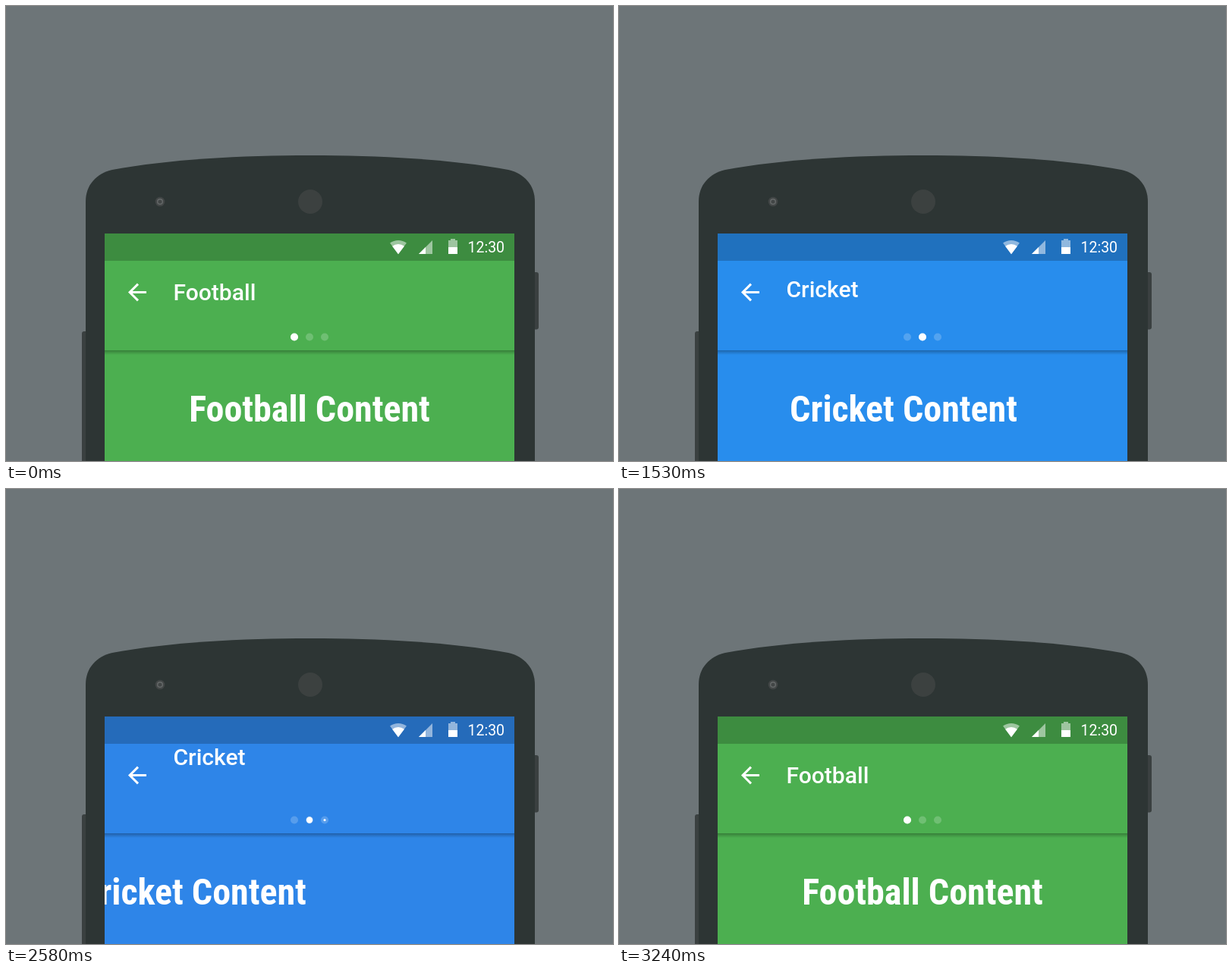
Animation, 800 px wide and 600 px high, one loop 4.14 s. Source, as an HTML page with a canvas:

```html
<!DOCTYPE html>
<html lang="en">
<head>
<meta charset="utf-8">
<title>Sports pager</title>
<style>
  html, body { margin: 0; width: 100%; height: 100%; overflow: hidden; background: #6d7578; }
  canvas { display: block; width: 800px; height: 600px; }
</style>
</head>
<body>
<canvas id="stage" width="800" height="600"></canvas>
<script>
const ctx = document.getElementById('stage').getContext('2d');
const LOOP = 4140, STEP = 30, SLIDE = 300;
const SCREEN = { x: 130, y: 300, w: 540, h: 300 };
const BAR_TOP = 336, BAR_BOTTOM = 454;
const TITLE_RATIO = 0.155;

const pages = [
  { name: 'Football', color: [76, 175, 80] },
  { name: 'Cricket', color: [33, 150, 243] },
  { name: 'Golf', color: [103, 58, 183] }
];

// Backward slides replay the forward motion in reverse.
const slides = [
  { start: 900, from: 0, to: 1 },
  { start: 1500, from: 1, to: 2 },
  { start: 2335, from: 2, to: 1 },
  { start: 2939, from: 1, to: 0 }
];

const clamp = v => Math.min(1, Math.max(0, v));
const rgb = c => `rgb(${c.map(Math.round).join(',')})`;
const white = a => `rgba(255,255,255,${a})`;
const leaveOffset = p => -25000 * p ** 3;
const enterOffset = p => p < 1 ? 2400 * 2 ** (-10 * p) : 0;

function rect(x, y, w, h, fill) {
  ctx.fillStyle = fill;
  ctx.fillRect(x, y, w, h);
}

function circle(x, y, r, fill) {
  ctx.fillStyle = fill;
  ctx.beginPath();
  ctx.arc(x, y, r, 0, Math.PI * 2);
  ctx.fill();
}

function polygon(points, fill) {
  ctx.fillStyle = fill;
  ctx.beginPath();
  points.forEach(([x, y]) => ctx.lineTo(x, y));
  ctx.fill();
}

function text(str, x, y, font, align = 'left') {
  ctx.font = font;
  ctx.textAlign = align;
  ctx.fillStyle = '#fff';
  ctx.fillText(str, x, y);
}

function clipped(x, y, w, h, draw) {
  ctx.save();
  ctx.beginPath();
  ctx.rect(x, y, w, h);
  ctx.clip();
  draw();
  ctx.restore();
}

function pose(time) {
  let page = 0;
  for (const { start, from, to } of slides) {
    if (time <= start) break;
    const p = (time - start) / SLIDE;
    if (p < 1) return to > from ? { left: from, right: to, p } : { left: to, right: from, p: 1 - p };
    page = to;
  }
  return { left: page, right: page, p: 1 };
}

function drawPhone() {
  rect(0, 0, 800, 600, '#6d7578');
  ctx.fillStyle = '#3a4040';
  ctx.beginPath();
  ctx.roundRect(100, 429, 10, 180, 3);
  ctx.roundRect(692, 351, 10, 75.5, 3);
  ctx.fill();
  ctx.fillStyle = '#2d3534';
  ctx.beginPath();
  ctx.moveTo(105, 600);
  ctx.lineTo(105, 258);
  ctx.bezierCurveTo(105, 236, 119, 221, 140, 216);
  ctx.bezierCurveTo(215, 202, 310, 197, 401, 197);
  ctx.bezierCurveTo(492, 197, 587, 202, 662, 216);
  ctx.bezierCurveTo(683, 221, 697, 236, 697, 258);
  ctx.lineTo(697, 600);
  ctx.fill();
  circle(401, 258, 16, '#3c4140');
  circle(203, 258, 6.3, '#424646');
  circle(203, 258, 4, '#666a6a');
  circle(203, 258, 2.6, '#424646');
}

function drawStatusIcons() {
  const wedge = (r, fill) => {
    ctx.fillStyle = fill;
    ctx.beginPath();
    ctx.moveTo(517, 327.3);
    ctx.arc(517, 327.3, r, -Math.PI / 2 - 0.64, -Math.PI / 2 + 0.64);
    ctx.fill();
  };
  wedge(18.3, white(0.5));
  wedge(13.2, '#fff');
  polygon([[544, 327], [562, 309], [562, 327]], white(0.5));
  polygon([[544, 327], [553, 318], [553, 327]], '#fff');
  rect(586, 307, 6, 2, white(0.5));
  rect(583, 309, 12, 9, white(0.5));
  rect(583, 318, 12, 9, '#fff');
  text('12:30', 608.5, 325, '400 19.5px Roboto, sans-serif');
}

function drawArrow() {
  ctx.strokeStyle = '#fff';
  ctx.lineWidth = 3;
  ctx.beginPath();
  ctx.moveTo(185, 377.5);
  ctx.lineTo(163.5, 377.5);
  ctx.moveTo(174, 366.6);
  ctx.lineTo(163.1, 377.5);
  ctx.lineTo(174, 388.4);
  ctx.stroke();
}

function drawDots({ left, right, p }) {
  const u = clamp((p - 0.1) / 0.5);
  pages.forEach((_, i) => {
    const x = 380 + i * 20;
    circle(x, 436.5, 5, white(0.2));
    const size = i === right ? 1 - (1 - u) ** 2 : i === left ? 1 - u : 0;
    if (size > 0) circle(x, 436.5, 5 * size, '#fff');
  });
}

function drawPage({ name }, offset) {
  clipped(SCREEN.x, BAR_TOP, SCREEN.w, BAR_BOTTOM - BAR_TOP, () =>
    text(name, 220.5, 388 + offset * TITLE_RATIO, '500 30px Roboto, sans-serif'));
  clipped(SCREEN.x, BAR_BOTTOM, SCREEN.w, 146, () =>
    text(name + ' Content', 400 + offset, 548,
      'bold condensed 48px "Roboto Condensed", Roboto, sans-serif', 'center'));
}

function drawScreen(state) {
  const { left, right, p } = state;
  const color = pages[left].color.map((c, i) => c + (pages[right].color[i] - c) * p);
  rect(SCREEN.x, SCREEN.y, SCREEN.w, SCREEN.h, rgb(color));
  rect(SCREEN.x, SCREEN.y, SCREEN.w, BAR_TOP - SCREEN.y, 'rgba(0,0,0,0.2)');

  const shadow = ctx.createLinearGradient(0, BAR_BOTTOM, 0, BAR_BOTTOM + 6);
  shadow.addColorStop(0, 'rgba(0,0,0,0.28)');
  shadow.addColorStop(1, 'rgba(0,0,0,0)');
  rect(SCREEN.x, BAR_BOTTOM, SCREEN.w, 6, shadow);

  if (left !== right) drawPage(pages[left], leaveOffset(p));
  drawPage(pages[right], enterOffset(p));
  drawStatusIcons();
  drawArrow();
  drawDots(state);
}

function frame(now) {
  const time = Math.floor((now % LOOP) / STEP) * STEP;
  drawPhone();
  drawScreen(pose(time));
  requestAnimationFrame(frame);
}

requestAnimationFrame(frame);
</script>
</body>
</html>
```
